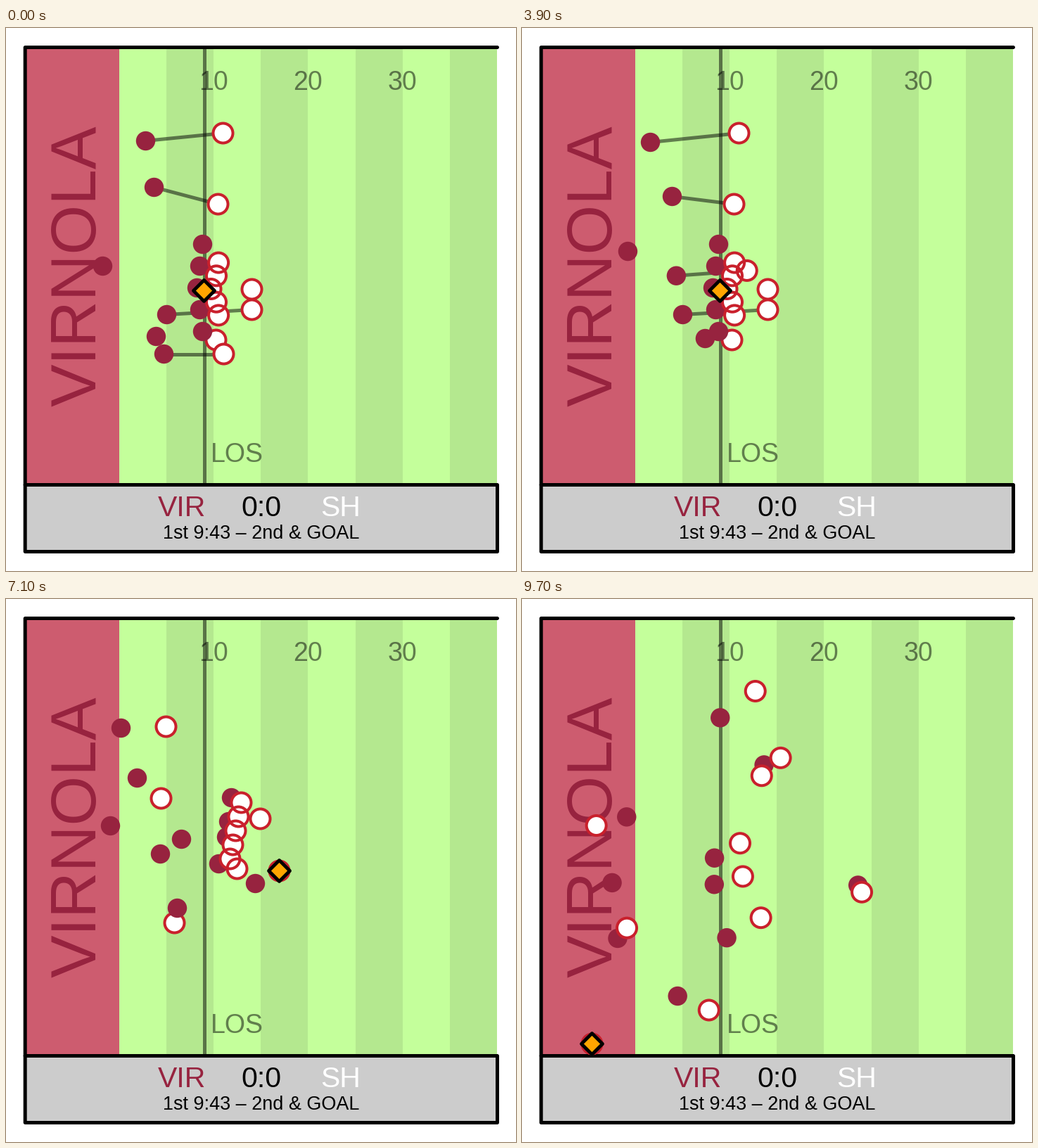
These frames come from a looping animation (725x772 px, 9800 ms). A matplotlib script:

```python
import matplotlib.pyplot as plt
import numpy as np
from matplotlib.animation import FuncAnimation
from matplotlib.patches import Circle, Polygon, Rectangle

W, H, DPI = 725, 772, 100
FRAMES, STEP = 98, 100
PT = 72 / DPI  # points per pixel

MAROON, RED = "#97233F", "#C9202C"
LIGHT, DARK, END_ZONE = "#C4FF9B", "#B4E88F", "#CD5C6F"
LEFT, TOP, RIGHT, BASE, BOTTOM = 26.7, 27, 698, 649, 744
GOAL, STRIPE = 160.6, 67.1
LOS = 282

# Phases of the play, in seconds
SNAP, HANDLED, GO, CUT, THROW, DEEP, CATCH, END = 5.1, 5.8, 5.3, 7.1, 7.7, 8.9, 9.05, 9.7
SPOT = np.array((281, 373))
FINISH = np.array((99, 632))
MOMENTUM = 0.35

now = np.arange(FRAMES) * STEP / 1000


def track(points, times):
    """Monotone cubic path through the waypoints, one row per frame."""
    p, t = np.array(points, float), np.array(times, float)
    h = np.diff(t)
    d = np.diff(p, axis=0) / h[:, None]
    a, b = d[:-1], d[1:]
    same = a * b > 0
    inner = np.where(same, 2 * a * b / np.where(same, a + b, 1), 0)
    m = np.vstack([0 * d[:1], inner, d[-1:]])
    i = np.clip(np.searchsorted(t, now, side="right") - 1, 0, len(h) - 1)
    u = np.clip((now - t[i]) / h[i], 0, 1)[:, None]
    span = h[i][:, None]
    return ((1 + 2 * u) * (1 - u) ** 2 * p[i] + u * (1 - u) ** 2 * span * m[i]
            + u * u * (3 - 2 * u) * p[i + 1] + u * u * (u - 1) * span * m[i + 1])


def route(stance, cut, deep, start=None, shift=(0, 4), pursuit=0.05):
    """Shift before the snap, run to two points, then close in on the finish."""
    cut, deep = np.array(cut), np.array(deep)
    drift = MOMENTUM * (1 - pursuit) * (deep - cut)
    end = deep + drift + pursuit * (FINISH - deep)
    return track([start or stance, stance, stance, cut, deep, end],
                 [*shift, GO, CUT, DEEP, END])


MOTION = (1.2, GO - 0.01)

# Receivers and the defenders covering them, in the same order
receivers = [
    route((308, 149), (227, 181), (137, 273)),
    route((301, 250), (220, 283), (169, 413)),
    route((323, 301), (328, 383), (288, 530), start=(309, 463), shift=MOTION),
    route((349, 400), (361, 312), (348, 158)),
]
coverage = [
    route((182, 162), (163, 183), (154, 264), start=(198, 160)),
    route((213, 239), (186, 254), (150, 417), start=(210, 226)),
    route((217, 311), (249, 341), (280, 195), start=(224, 463), shift=MOTION),
    route((228, 407), (219, 362), (225, 509)),
]
safety = route((150, 317), (148, 322), (134, 373), start=(137, 338))
nickel = route((260, 441), (243, 439), (137, 559), start=(213, 438), pursuit=1)
passer = route((349, 371), (388, 386), (473, 400))
carrier = route((298, 443), (239, 460), (129, 569), pursuit=1)

# Both lines, from top to bottom
SLOTS = range(-2, 3)
BLOCK_DEEP = [(369, 226), (347, 251), (322, 331), (324, 373), (343, 424)]
RUSH_CUT = [(320, 282), (316, 316), (313, 338), (302, 376), (354, 404)]
RUSH_DEEP = [(347, 232), (291, 344), (290, 379), (301, 448), (460, 397)]
blockers = [route((291 + 7.5 * abs(j) ** 0.5, 370.5 + 18.7 * j),
                  (326 - 4 * j, 329 + 20 * j), deep)
            for j, deep in zip(SLOTS, BLOCK_DEEP)]
rushers = [route((271 + 4 * abs(j), 369 + 31 * j), cut, deep)
           for j, cut, deep in zip(SLOTS, RUSH_CUT, RUSH_DEEP)]


def handover(a, b, t0, t1):
    """Move from path a to path b between two times."""
    u = np.clip((now - t0) / (t1 - t0), 0, 1)[:, None]
    return a + (b - a) * u


ball_path = handover(SPOT, passer, SNAP, HANDLED)
ball_path = handover(ball_path, carrier, THROW, CATCH)

# Whole coordinates fall on pixel centres
fig = plt.figure(figsize=(W / DPI, H / DPI), dpi=DPI, facecolor="white")
ax = fig.add_axes([0, 0, 1, 1])
ax.set_xlim(-0.5, W - 0.5)
ax.set_ylim(H - 0.5, -0.5)
ax.axis("off")


def box(x0, y0, x1, y1, color):
    ax.add_patch(Rectangle((x0, y0), x1 - x0, y1 - y0, fc=color, lw=0, zorder=1))


def stroke(xs, ys, cap="round", **style):
    return ax.plot(xs, ys, lw=5 * PT, color="black", solid_capstyle=cap,
                   solid_joinstyle="round", **style)[0]


def label(x, y, text, px, color="black", ha="center", **style):
    ax.text(x, y, text, fontsize=px * PT, color=color, family="Liberation Sans",
            ha=ha, va="baseline", zorder=2, **style)


# Field
for k in range(8):
    x = GOAL + k * STRIPE
    box(x, TOP, x + STRIPE, BASE, DARK if k % 2 else LIGHT)
box(LEFT, TOP, GOAL, BASE, END_ZONE)
box(LEFT, BASE, RIGHT, BOTTOM, "#CCCCCC")
for yards in (10, 20, 30):
    label(GOAL + yards / 5 * STRIPE, 87.5, str(yards), 37.5, alpha=0.5)
label(290.5, 616.5, "LOS", 37.5, alpha=0.5, ha="left")
label(127, 338, "VIRNOLA", 91, MAROON, rotation=90, rotation_mode="anchor")
stroke([LOS, LOS], [TOP, BASE], cap="butt", alpha=0.5, zorder=3)

# Scoreboard
label(249, 694, "VIR", 41, MAROON)
label(362, 694, "0:0", 41)
label(475.5, 694, "SH", 41, "white")
label(362.5, 726, "1st 9:43 \u2013 2nd & GOAL", 27)

# Border
stroke([RIGHT, LEFT, LEFT, RIGHT, RIGHT, LEFT],
       [TOP, TOP, BOTTOM, BOTTOM, BASE, BASE], zorder=4, snap=False)

links = [stroke([], [], cap="butt", alpha=0.5, zorder=5) for _ in receivers]
movers = []


def dot(path, radius, zorder, **style):
    patch = ax.add_patch(Circle((0, 0), radius, zorder=zorder, **style))
    movers.append((patch, path))


def ringed(path, zorder):
    dot(path, 14, zorder, fc="white", lw=0)
    dot(path, 14, zorder + 0.5, fc="none", ec=RED, lw=4 * PT)


ringed(carrier, 6)
for path in coverage + rushers + [safety, nickel]:
    dot(path, 13.7, 7, fc=MAROON, lw=0)
for path in receivers + blockers + [passer]:
    ringed(path, 8)

DIAMOND = 15 * np.array([(0, -1), (1, 0), (0, 1), (-1, 0)])
ball = ax.add_patch(Polygon(DIAMOND, fc="#FFA500", ec="black", lw=4.8 * PT,
                            joinstyle="round", zorder=9))


def update(n):
    for patch, path in movers:
        patch.center = path[n]
    ball.set_xy(DIAMOND + ball_path[n])
    for link, a, b in zip(links, coverage, receivers):
        link.set_data(*zip(a[n], b[n]))
        link.set_visible(now[n] < SNAP)
    return []


anim = FuncAnimation(fig, update, frames=FRAMES, interval=STEP, repeat=True,
                     repeat_delay=0, init_func=lambda: update(0))
plt.show()
```
